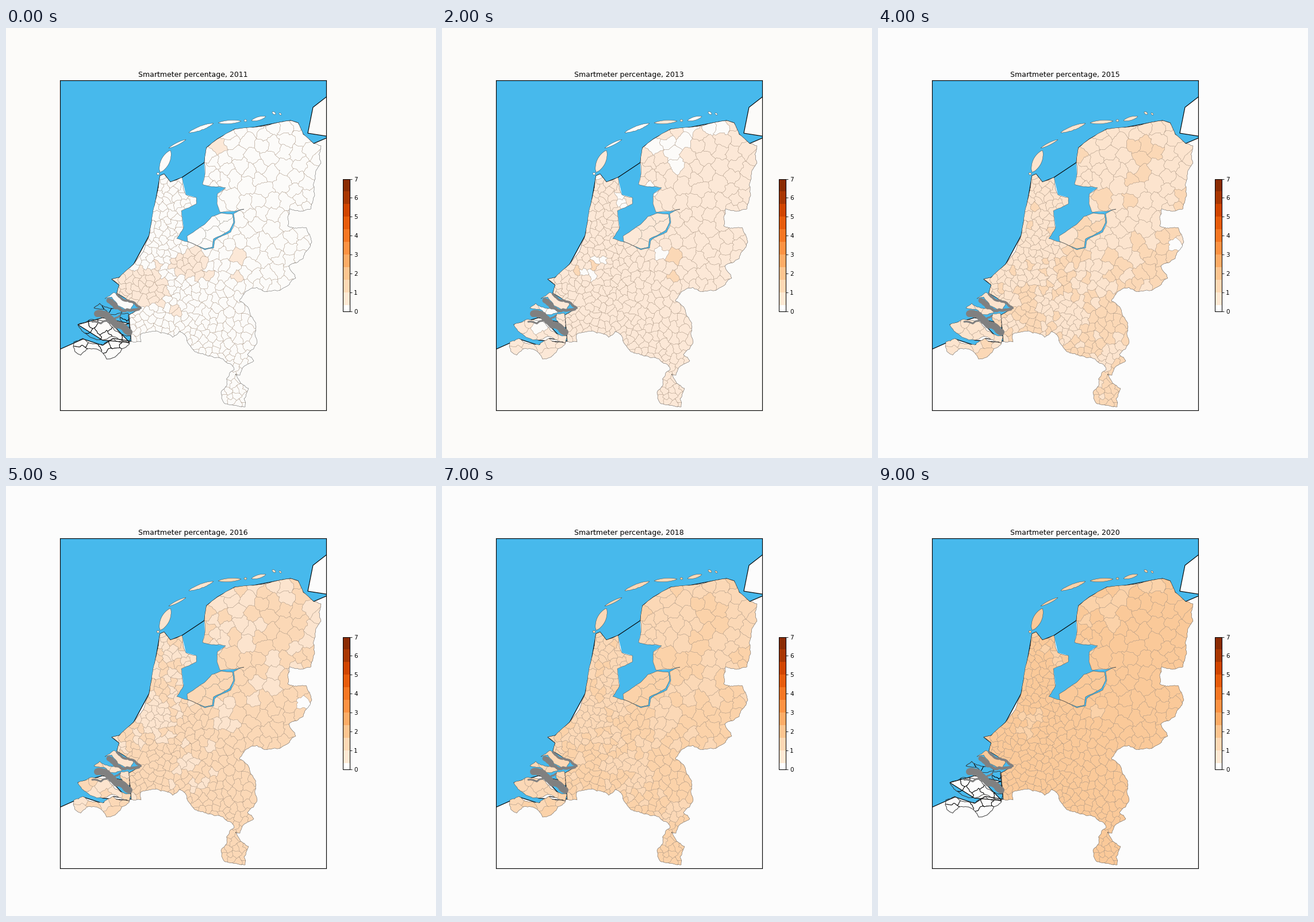
These frames come from a looping animation (748 px wide and 748 px high, 10 s). A matplotlib script:

```python
import numpy as np
import matplotlib.pyplot as plt
from matplotlib.animation import FuncAnimation
from matplotlib.cm import ScalarMappable
from matplotlib.collections import PolyCollection
from matplotlib.colors import BoundaryNorm, ListedColormap
from matplotlib.patches import Polygon
from matplotlib.path import Path

SIZE, DPI = 748, 74.8
SEA, GRAY = "#47b9ec", "#808080"
rng = np.random.default_rng(11)

# ---------- outlines: a few key points, made rough by rule ----------

north = [(345, 234), (349, 208), (368, 193), (398, 176), (430, 173), (482, 163),
         (495, 161), (508, 165), (517, 185), (535, 201)]
east = [(535, 201), (548, 205), (548, 235), (536, 280), (530, 315), (493, 315),
        (490, 344), (522, 347), (532, 372), (517, 401), (492, 414), (504, 435),
        (489, 449), (460, 458), (428, 452), (413, 464), (406, 475), (424, 495),
        (435, 520), (437, 546), (420, 568), (431, 579), (411, 592), (407, 604)]
south = [(407, 604), (399, 602), (422, 627), (414, 645), (416, 659), (380, 653),
         (374, 634), (384, 622), (389, 600), (397, 594), (378, 576), (342, 566),
         (326, 560), (309, 532), (301, 528), (290, 538), (262, 527), (235, 532),
         (235, 546), (218, 545)]
west = [(218, 545), (213, 500), (236, 487), (193, 461), (197, 447), (184, 437),
        (197, 434), (222, 411), (249, 361), (261, 297), (268, 257), (275, 254),
        (286, 268), (306, 260)]
lake = [(306, 260), (313, 290), (331, 295), (331, 306), (305, 318), (309, 347),
        (297, 366), (333, 379), (346, 386), (361, 383), (363, 370), (391, 355),
        (398, 338), (396, 323), (414, 315), (397, 319), (372, 320), (367, 305),
        (368, 288), (382, 278), (342, 272), (346, 255), (345, 234)]
polder = [(315, 362), (345, 342), (358, 328), (375, 322), (394, 324), (396, 338),
          (389, 352), (361, 367), (359, 381), (346, 384), (316, 371)]
dune = (239, 389)

# tip, tip, breadth
isles = [(268, 251, 286, 213, 15), (283, 209, 313, 194, 4), (318, 182, 361, 166, 7),
         (369, 165, 409, 162, 6), (427, 161, 452, 154, 6), (414, 161, 419, 161, 4),
         (463, 146, 469, 150, 4), (475, 148, 479, 151, 3), (262, 253, 267, 254, 4)]
headland = [(172, 471), (188, 460), (222, 480), (216, 492), (195, 483), (184, 468)]
delta = [
    [(153, 487), (163, 479), (190, 487), (202, 495), (180, 498), (168, 489)],
    [(200, 497), (212, 496), (215, 521), (199, 508)],
    [(125, 516), (147, 507), (172, 509), (190, 527), (217, 536), (214, 548),
     (182, 537), (168, 543), (132, 527)],
    [(118, 546), (133, 540), (170, 551), (186, 540), (215, 549), (192, 570),
     (175, 576), (163, 561), (140, 559), (130, 569), (120, 563)],
]
# stroke breadth and course
inlets = [(4, [(193, 463), (212, 474), (234, 487)]),
          (9, [(179, 474), (191, 485)]),
          (5, [(190, 486), (204, 492), (231, 489)]),
          (12, [(159, 497), (176, 500), (192, 517), (214, 529)]),
          (3, [(150, 511), (165, 514), (176, 509), (198, 500)])]

coast = ([(80, 565), (134, 541), (168, 552), (187, 540)] + west + north
         + [(570, 186), (570, 680), (80, 680)])
coarse = [coast, [(570, 110), (534, 138), (525, 183), (570, 190)],
          [(125, 516), (168, 504), (214, 514), (190, 521), (215, 547), (168, 543)]]


def rough(pts, amp):
    """Split each piece at a shifted middle until all pieces are short."""
    pts = [np.array(p, float) for p in pts]
    out = [pts[0]]
    for a, b in zip(pts, pts[1:]):
        d = b - a
        if np.hypot(*d) > 4:
            mid = (a + b) / 2 + np.array([-d[1], d[0]]) * rng.uniform(-amp, amp)
            out.extend(rough([a, mid, b], amp)[1:])
        else:
            out.append(b)
    return np.array(out)


def ring(pts, amp):
    return rough(list(pts) + [pts[0]], amp)


def spindle(x0, y0, x1, y1, breadth):
    t = np.linspace(0, 1, 12)
    half = breadth / 2 * np.sin(np.pi * t) ** 0.7
    d = np.array([x1 - x0, y1 - y0], float)
    side = np.array([-d[1], d[0]]) / np.hypot(*d)
    axis = np.array([x0, y0]) + np.outer(t, d)
    upper, lower = axis + np.outer(half, side), axis - np.outer(half, side)
    return ring(np.vstack([upper, lower[-2:0:-1]]), 0.1)


mainland = np.vstack([rough(north, 0.03), rough(east, 0.14), rough(south, 0.14),
                      rough(west[:8] + [dune] + west[8:], 0.03), rough(lake, 0.06)])


# ---------- districts: warped cells around spaced random seeds ----------

BIG = [(390, 298, 38), (403, 398, 30), (240, 475, 28), (369, 206, 26),
       (402, 431, 15), (516, 376, 9)]
LEADERS = [(403, 398), (402, 431), (261, 411), (236, 429)]
HOLDOUT = (516, 376)


def spacing(x, y):
    """Small districts in the west and far south, large in the north-east."""
    return 11 + 11 * np.clip((x - 300) / 120, 0, 1) * np.clip((600 - y) / 250, 0, 1)


def scatter(outline, gap, seeds=()):
    seeds = list(seeds)
    path = Path(outline)
    tries = rng.uniform(outline.min(axis=0), outline.max(axis=0), (12000, 2))
    for x, y in tries[path.contains_points(tries)]:
        r = gap(x, y) * rng.uniform(0.75, 1.15)
        if all(np.hypot(x - sx, y - sy) > 0.45 * (r + sr) for sx, sy, sr in seeds):
            seeds.append((x, y, r))
    return np.array(seeds)[:, :2]


def cut(poly, mid, normal):
    """Keep the part of a polygon behind a line."""
    side = [np.dot(np.subtract(p, mid), normal) for p in poly]
    out = []
    for i, p in enumerate(poly):
        s, t, q = side[i - 1], side[i], poly[i - 1]
        if (s <= 0) != (t <= 0):
            f = s / (s - t)
            out.append((q[0] + f * (p[0] - q[0]), q[1] + f * (p[1] - q[1])))
        if t <= 0:
            out.append(p)
    return out


def warp(p):
    x, y = p.T
    dx = 2.0 * np.sin(0.34 * y + 1.3 * np.sin(0.21 * x)) + 0.8 * np.sin(0.9 * y + 0.5 * x)
    dy = 2.0 * np.sin(0.31 * x + 1.3 * np.sin(0.23 * y)) + 0.8 * np.sin(0.8 * x - 0.6 * y)
    return np.column_stack([x + dx, y + dy])


def cells(seeds):
    polys = []
    for s in seeds:
        near = np.argsort(np.hypot(*(seeds - s).T))[1:28]
        poly = [tuple(s + c) for c in 70 * np.array([(-1, -1), (1, -1), (1, 1), (-1, 1)])]
        for o in seeds[near]:
            poly = cut(poly, (s + o) / 2, o - s)
        polys.append(warp(ring(poly, 0)))
    return polys


# ---------- figure ----------

fig = plt.figure(figsize=(SIZE / DPI, SIZE / DPI), dpi=DPI)
L, R, T, B = 93.5, 557.26, 90.9, 664.7
ax = fig.add_axes([L / SIZE, 1 - B / SIZE, (R - L) / SIZE, (B - T) / SIZE])
ax.set(xlim=(L, R), ylim=(B, T), xticks=[], yticks=[], facecolor=SEA)
ax.spines[:].set_linewidth(1.1)
title = ax.set_title("", fontsize=12, family="DejaVu Sans")

lands = [ax.add_patch(Polygon(p, ec="none", zorder=1)) for p in coarse]
ax.add_patch(Polygon(lake, fc=SEA, ec="none", zorder=1.2))
for p in coarse:
    ax.add_patch(Polygon(p, fill=False, ec="k", lw=1.1, zorder=1.4))
for breadth, course in inlets:
    x, y = rough(course, 0.15).T
    ax.plot(x, y, color=GRAY, lw=breadth * 72 / DPI, zorder=5,
            solid_capstyle="round", solid_joinstyle="round")

regions = []


def add_region(outline, gap, seeds=(), blank=False):
    spots = scatter(outline, gap, seeds)
    coll = PolyCollection(cells(spots), zorder=3)
    ax.add_collection(coll, autolim=False)
    coll.set_clip_path(Path(outline), ax.transData)
    edge = ax.add_patch(Polygon(outline, fill=False, ec="#333333", zorder=4))
    regions.append((coll, edge, spots, blank))


add_region(mainland, spacing, BIG)
add_region(ring(polder, 0.03), lambda x, y: 34)
for isle in isles:
    add_region(spindle(*isle), lambda x, y: 99)
add_region(ring(headland, 0.1), lambda x, y: 99)
for p in delta:
    add_region(ring(p, 0.12), lambda x, y: 22, blank=True)

# colour scale: half a step of white, then ten equal steps
bar = 0.4 * 0.77
cax = fig.add_axes([586.25 / SIZE, 0.495 - bar / 2, bar / 20, bar])
bounds = np.r_[0, np.linspace(1 / 3, 7, 11)]
shades = ["#ffffff"] + list(plt.get_cmap("Oranges")(np.linspace(0.1, 0.96, 10)))
scale = ScalarMappable(BoundaryNorm(bounds, 11), ListedColormap(shades))
cbar = fig.colorbar(scale, cax=cax, spacing="proportional", ticks=range(8))
cbar.outline.set_linewidth(1)
cbar.ax.minorticks_off()
cbar.ax.set_yticklabels([str(v) for v in range(8)], fontsize=10)

# ---------- spread over the years ----------

TONES = ["#fce8d7", "#fce4ce", "#fbd8b6", "#fbd2a9", "#fac999"]
# lower tone, upper tone, share of districts on the upper one; 0 is paper
GROWTH = [(0, 0, 0), (0, 0, 0), (0, 1, 0.93), (2, 3, 0.06), (2, 3, 0.35),
          (2, 3, 0.7), (3, 5, 0.07), (3, 4, 0.5), (4, 5, 0.4), (4, 5, 0.92)]
# ellipses where the first meters appear, by year: centre and half axes
PIONEERS = [
    [(235, 447, 50, 28), (318, 406, 34, 23), (240, 474, 34, 14), (345, 428, 22, 9),
     (369, 206, 15, 15), (403, 398, 10, 10), (402, 431, 8, 8), (341, 483, 9, 6),
     (294, 491, 14, 7), (197, 472, 12, 10)],
    [(265, 508, 64, 38), (417, 540, 28, 48), (398, 628, 32, 38), (350, 477, 32, 10),
     (508, 362, 26, 18), (488, 390, 26, 9), (278, 233, 12, 20), (349, 367, 12, 12)],
]

centres = np.vstack([r[2] for r in regions])
cx, cy = centres.T
drift = (np.sin(cx / 23) * np.sin(cy / 29) + rng.uniform(-1, 1, len(cx))
         + (cx + cy - 800) / 250)
rank = drift.argsort().argsort() / len(cx)


def nearest(p):
    return np.argmin(np.hypot(*(centres - p).T))


def tones(i):
    low, high, share = GROWTH[i]
    out = np.where(rank >= 1 - share, high, low)
    if i < 2:
        for zone in PIONEERS[:i + 1]:
            for x, y, rx, ry in zone:
                out[np.hypot((cx - x) / rx, (cy - y) / ry) < 1] = 1
    lead = [nearest(p) for p in LEADERS]
    if i < 5:
        out[lead] = 3 if i else 1
    if 2 < i < 6:
        out[nearest(HOLDOUT)] = 0
    return out


def update(i):
    paper = "#fcfbf9" if i < 3 else "#fcfcfc"
    fig.set_facecolor(paper)
    title.set_text(f"Smartmeter percentage, {2011 + i}")
    for land in lands:
        land.set_facecolor(paper)
    colours = [([paper] + TONES)[t] for t in tones(i)]
    start = 0
    for coll, edge, spots, blank in regions:
        empty = blank and i in (0, 1, 9)
        stop = start + len(spots)
        coll.set_facecolor("none" if empty else colours[start:stop])
        coll.set_edgecolor("k" if empty else "#a08a76")
        coll.set_linewidth(0.7 if empty else 0.35)
        edge.set_linewidth(0.9 if empty else 0.4)
        start = stop
    return []


anim = FuncAnimation(fig, update, frames=10, interval=1000, repeat=True,
                     repeat_delay=0, blit=False)
plt.show()
```
